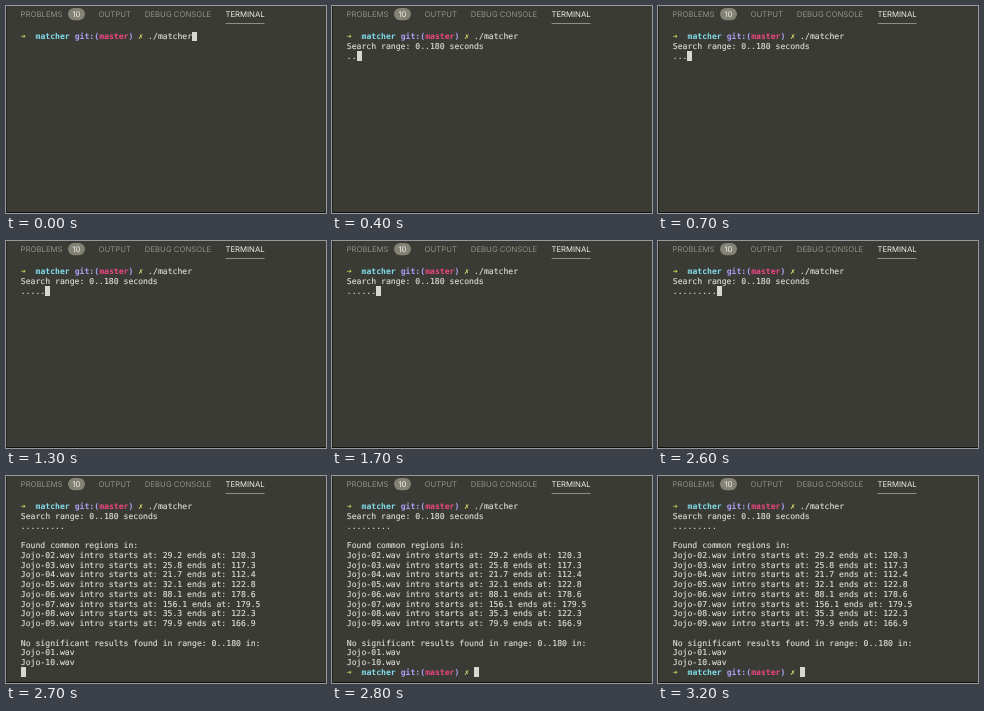
Animation of 320x207 px, one loop 3500 ms. Source, as an HTML page:

```html
<!DOCTYPE html>
<html lang="en">
<meta charset="utf-8">
<title>Terminal</title>
<style>
  html, body { margin: 0; width: 100%; height: 100%; overflow: hidden; background: #3b3b35; }
  #stage { position: absolute; left: 0; top: 0; width: 320px; height: 207px; overflow: hidden;
    text-rendering: geometricPrecision; }
  svg { position: absolute; left: 0; top: 0; }
  svg text { font: 7.75px Inter, Roboto, sans-serif; fill: #91918b; }
  svg .on { fill: #f0f0ec; }
  pre { position: absolute; left: 14.8px; top: 26.2px; margin: 0; color: #e0e0da;
    font: 8.15px/9.75px "DejaVu Sans Mono", monospace; -webkit-text-stroke: .12px; }
  b { -webkit-text-stroke: 0; }
  b.arrow { color: #c3dc55; }
  b.dir { color: #80dcea; }
  b.git { color: #aaa0f4; }
  b.branch { color: #ee4683; }
  b.dirty { color: #e2df72; }
  i { display: inline-block; position: relative; top: -.5px; width: 5px; height: 9.75px;
    vertical-align: top; background: #d8d8d3; }
</style>
<div id="stage">
  <svg width="320" height="207">
    <path d="M.5 0V207" stroke="#24241f"/>
    <path d="M0 206.5H320" stroke="#10100e"/>
    <text x="14.6" y="11.1">PROBLEMS</text>
    <rect x="62" y="2" width="17" height="12.2" rx="6.1" fill="#838274"/>
    <text class="on" x="70.5" y="11" text-anchor="middle">10</text>
    <text x="92.5" y="11.1">OUTPUT</text>
    <text x="138.8" y="11.1">DEBUG CONSOLE</text>
    <text class="on" x="219.4" y="11.1">TERMINAL</text>
    <path d="M219.6 17.5H258.6" stroke="#a5a594" stroke-width=".8"/>
  </svg>
  <pre id="term"></pre>
</div>
<script>
  const LOOP = 3500, ENTER = 100, DONE = 2700, PROMPT = 2800;
  const term = document.getElementById('term');

  const prompt = '<b class="arrow">➜</b>  <b class="dir">matcher</b> ' +
    '<b class="git">git:(</b><b class="branch">master</b><b class="git">)</b> ' +
    '<b class="dirty">✗</b> ';

  const regions = [
    ['02', 29.2, 120.3], ['03', 25.8, 117.3], ['04', 21.7, 112.4], ['05', 32.1, 122.8],
    ['06', 88.1, 178.6], ['07', 156.1, 179.5], ['08', 35.3, 122.3], ['09', 79.9, 166.9]
  ].map(([id, from, to]) => `Jojo-${id}.wav intro starts at: ${from} ends at: ${to}`);

  const results = ['', '', 'Found common regions in:', ...regions, '',
    'No significant results found in range: 0..180 in:',
    'Jojo-01.wav', 'Jojo-10.wav', ''].join('\n');

  function screen(t) {
    let out = prompt + './matcher';
    if (t >= ENTER) {
      const dots = Math.min(9, Math.floor((t + 200) / 300));
      out += '\nSearch range: 0..180 seconds\n' + '.'.repeat(dots);
    }
    if (t >= DONE) out += results;
    if (t >= PROMPT) out += prompt;
    return out + '<i></i>';
  }

  let shown;
  function draw() {
    const next = screen(performance.now() % LOOP);
    if (next !== shown) term.innerHTML = shown = next;
    requestAnimationFrame(draw);
  }
  draw();
</script>
</html>
```
